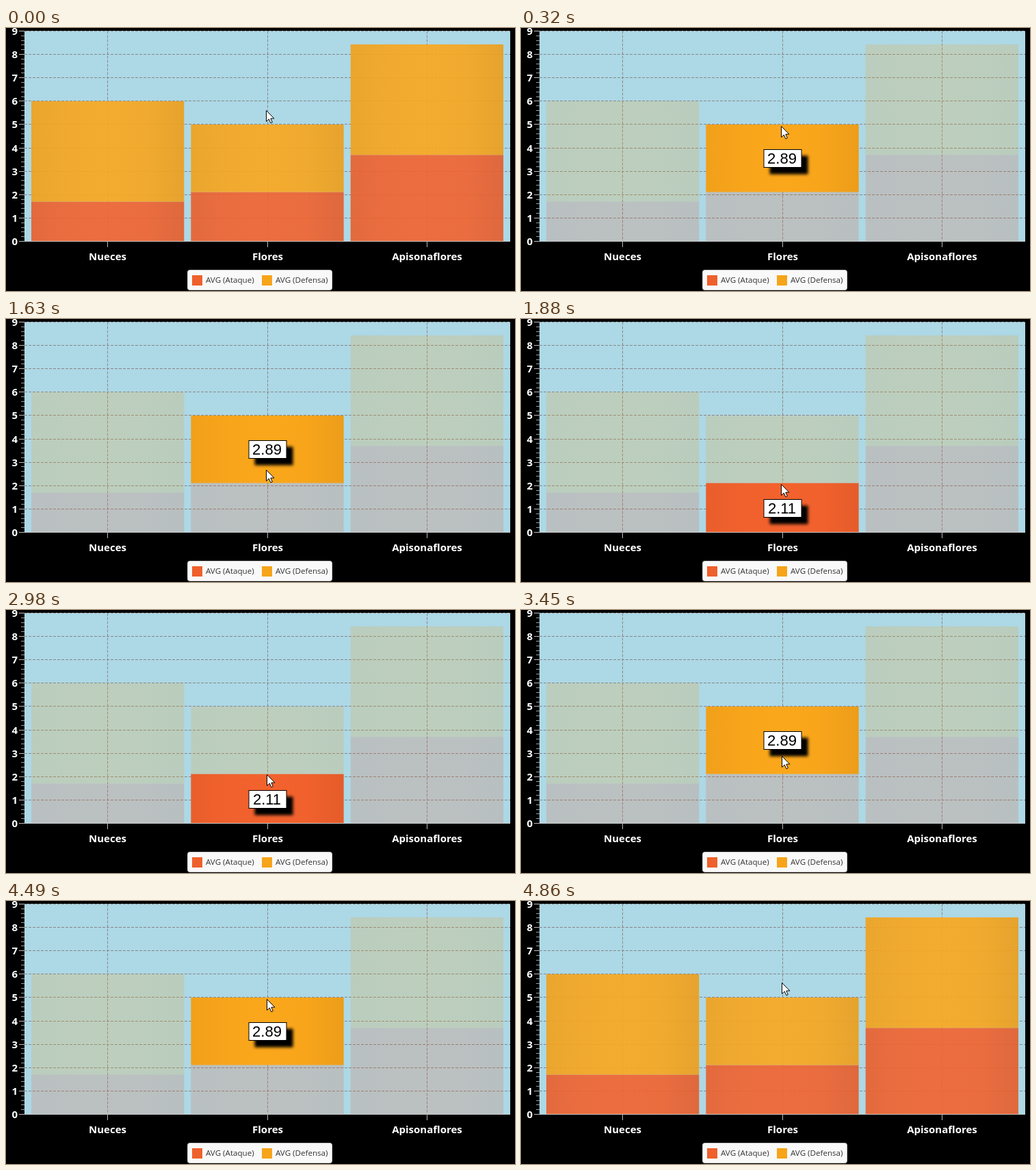
Animation of 744 by 384 pixels, one loop 5.61 s. Source, as an HTML page:

```html
<!DOCTYPE html>
<html lang="es">
<head>
<meta charset="utf-8">
<title>Stacked bars</title>
<style>
  html, body { margin: 0; width: 100%; height: 100%; overflow: hidden; background: #000; }
  svg { display: block; width: 744px; height: 384px; }
  .axis { font: 700 15px "Open Sans", "Noto Sans", sans-serif; fill: #fff; }
  .legend { font: 11.6px "Open Sans", "Noto Sans", sans-serif; fill: #333; }
  .tip { font: 22px "Liberation Sans", Arial, sans-serif; fill: #000; }
</style>
</head>
<body>
<svg id="stage" viewBox="0 0 744 384">
  <defs>
    <filter id="shadow" x="-30%" y="-50%" width="180%" height="220%">
      <feDropShadow dx="9" dy="9.5" stdDeviation="2" flood-color="#000"/>
    </filter>
  </defs>
</svg>
<script>
const LOOP = 5610;
const PLOT = { left: 27, right: 737, top: 4.5, bottom: 311.5 };
const UNIT = (PLOT.bottom - PLOT.top) / 9;
const SLOT = 700 / 3, BAR = 223.3;
const COLORS = { Ataque: [243, 98, 45], Defensa: [251, 167, 27] };
const DATA = [
  { name: "Nueces", Ataque: 1.7, Defensa: 4.3 },
  { name: "Flores", Ataque: 2.11, Defensa: 2.89 },
  { name: "Apisonaflores", Ataque: 3.7, Defensa: 4.73 }
];
// Pointer path: time, x, y
const PATH = [
  [30, 380, 120], [570, 380, 162], [1040, 380, 194], [1320, 380, 194],
  [1880, 380, 241], [2320, 381, 265], [2680, 381, 265], [2980, 381, 240],
  [3220, 381, 223], [3450, 381, 213], [3810, 381, 189], [4390, 381, 150],
  [4490, 381, 143], [4860, 381, 119]
];

const stage = document.getElementById("stage");

function add(tag, attrs, parent = stage, text = "") {
  const el = document.createElementNS(stage.namespaceURI, tag);
  for (const key in attrs) el.setAttribute(key, attrs[key]);
  el.textContent = text;
  parent.append(el);
  return el;
}
const line = (x1, y1, x2, y2, stroke, extra) =>
  add("line", { x1, y1, x2, y2, stroke, ...extra });
const rect = (x, y, width, height, fill, extra, parent) =>
  add("rect", { x, y, width, height, fill, ...extra }, parent);
const label = (x, y, cls, anchor, text, parent) =>
  add("text", { x, y, class: cls, "text-anchor": anchor }, parent, text);
const yOf = value => PLOT.bottom - value * UNIT;
const crisp = v => Math.floor(v) + 0.5;
const shade = (rgb, k) => `rgb(${rgb.map(c => Math.round(c * k))})`;

function drawAxes() {
  const dashed = { "stroke-dasharray": "4 2" };
  rect(PLOT.left, 4, PLOT.right - PLOT.left, 308, "#add8e6");
  DATA.forEach((d, i) => {
    const x = crisp(32 + SLOT * (i + 0.5));
    line(x, PLOT.top, x, PLOT.bottom, "#888", dashed);
    line(x, 312, x, 320, "#bbb");
    label(x, 339, "axis", "middle", d.name);
  });
  for (let i = 0; i <= 45; i++) {
    const y = crisp(yOf(i / 5)), major = i % 5 === 0;
    line(major ? 19 : 22, y, PLOT.left, y, major ? "#bbb" : "#999");
    if (!major) continue;
    line(PLOT.left, y, PLOT.right, y, "#888", dashed);
    label(17, y + 5.5, "axis", "end", i / 5);
  }
}

function drawBars() {
  const segments = [];
  for (const name in COLORS) {
    const grad = add("linearGradient", { id: name }, stage.querySelector("defs"));
    [0.96, 0.99, 1, 0.99, 0.94].forEach((k, i) =>
      add("stop", { offset: i / 4, "stop-color": shade(COLORS[name], k) }, grad));
  }
  DATA.forEach((d, i) => {
    let base = 0;
    for (const name in COLORS) {
      const top = yOf(base + d[name]), bottom = yOf(base);
      const x = 37 + SLOT * i;
      const el = rect(x, top, BAR, bottom - top, `url(#${name})`);
      segments.push({ el, x, top, bottom, value: d[name] });
      base += d[name];
    }
  });
  line(PLOT.left, 311.5, PLOT.right, 311.5, "#c4c4c4");
  return segments;
}

function drawLegend() {
  rect(265.5, 353.5, 211, 29, "#f9f9f9", { rx: 3, stroke: "#c8c8c8" });
  Object.keys(COLORS).forEach((name, i) => {
    const x = 272 + 102 * i;
    rect(x, 361, 15, 15, shade(COLORS[name], 0.98));
    label(x + 20, 372, "legend", "start", `AVG (${name})`);
  });
}

function pointerAt(t) {
  const next = PATH.findIndex(p => p[0] > t);
  if (next === 0) return PATH[0].slice(1);
  if (next < 0) return PATH[PATH.length - 1].slice(1);
  const [t0, x0, y0] = PATH[next - 1], [t1, x1, y1] = PATH[next];
  const k = (t - t0) / (t1 - t0);
  return [Math.round(x0 + (x1 - x0) * k), Math.round(y0 + (y1 - y0) * k)];
}

drawAxes();
const segments = drawBars();
drawLegend();

const tip = add("g", {});
rect(355, 177, 55, 26, "#fff", { stroke: "#000", filter: "url(#shadow)" }, tip);
const tipText = label(381.5, 197, "tip", "middle", "", tip);
const cursor = add("path", {
  d: "M0 0V16L3.8 12.6L6.4 18.3L8.8 17.2L6.3 11.6H11.4Z",
  fill: "#fff", stroke: "#000", "stroke-linejoin": "round"
});

function render(t) {
  const [x, y] = pointerAt(t);
  const active = segments.find(s =>
    x >= s.x && x < s.x + BAR && y >= s.top && y < s.bottom);
  for (const s of segments)
    s.el.setAttribute("opacity", !active ? 0.9 : s === active ? 1 : 0.2);
  tip.setAttribute("visibility", active ? "visible" : "hidden");
  if (active) {
    const middle = Math.round((active.top + active.bottom) / 2);
    tip.setAttribute("transform", `translate(0 ${middle - 190 + 0.5})`);
    tipText.textContent = active.value.toFixed(2);
  }
  cursor.setAttribute("transform", `translate(${x + 0.5} ${y + 0.5})`);
}

const start = performance.now();
function tick() {
  render((performance.now() - start) % LOOP);
  requestAnimationFrame(tick);
}
tick();
</script>
</body>
</html>
```
